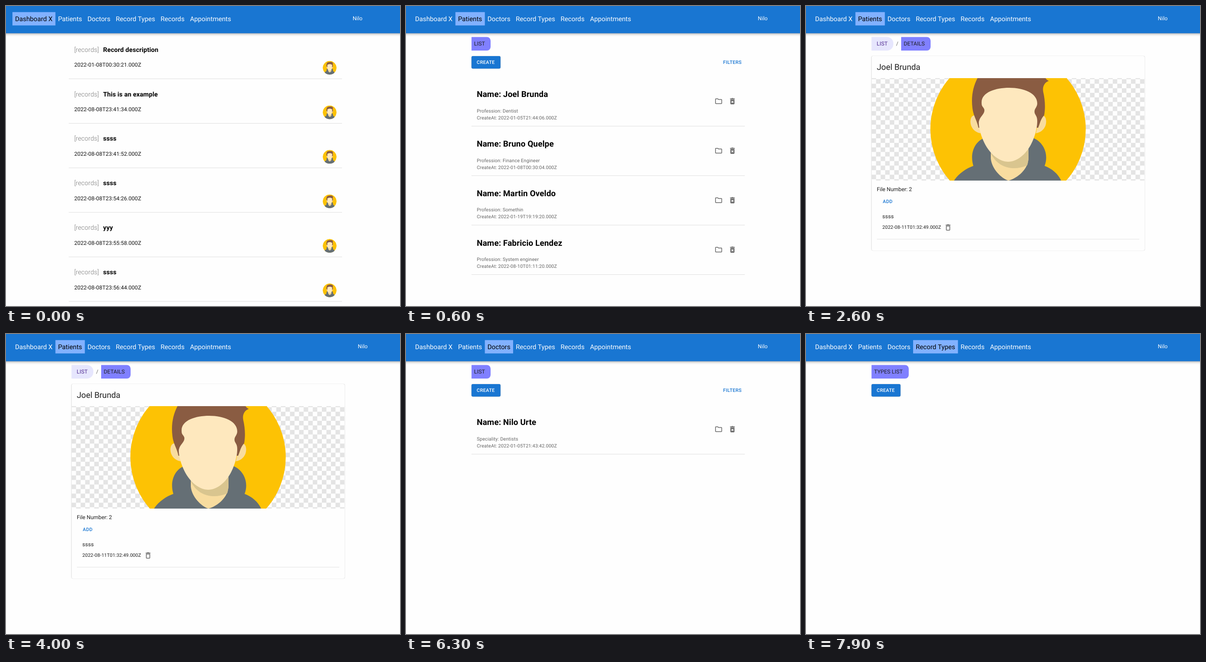
These frames come from a looping animation (857 px wide and 653 px high, 8 s). An HTML page:

```html
<!DOCTYPE html>
<html lang="en">
<head>
<meta charset="utf-8">
<title>Clinic dashboard</title>
<style>
  html, body { margin: 0; width: 100%; height: 100%; overflow: hidden; background: #fefefe; }
  svg { display: block; width: 100vw; height: 100vh; }
  text { font-family: Roboto, sans-serif; text-rendering: geometricPrecision; letter-spacing: .11px; white-space: pre; }
  .tight { letter-spacing: 0; }
  .btn { font-weight: 500; letter-spacing: .3px; }
  .bar { filter: drop-shadow(0 .8px 1.4px rgba(0,0,0,.22)) drop-shadow(0 3px 1.9px rgba(0,0,0,.14)) drop-shadow(0 .7px 3.7px rgba(0,0,0,.12)); }
  .raised { filter: drop-shadow(0 .7px .4px rgba(0,0,0,.2)) drop-shadow(0 .7px .4px rgba(0,0,0,.14)) drop-shadow(0 .7px 1.1px rgba(0,0,0,.12)); }
</style>
</head>
<body>
<svg id="stage" viewBox="0 0 857 653" preserveAspectRatio="none"></svg>
<script>
const BLUE = '#1976d2', INK = '#1f1f1f', GREY = '#666', VISITED = '#4f2a90', RULE = '#dedede';
const USER = 'Nilo';
const LOOP = 8000;

const text = (x, y, s, size = 11.89, fill = INK, weight = 400, cls = '') =>
  `<text x="${x}" y="${y}" font-size="${size}" fill="${fill}" font-weight="${weight}" class="${cls}">${s}</text>`;
const button = (x, y, s, fill = BLUE) => text(x, y, s, 10.4, fill, 500, 'btn');
const rect = (x, y, w, h, fill, extra = '') =>
  `<rect x="${x}" y="${y}" width="${w}" height="${h}" fill="${fill}" ${extra}/>`;
const path = (d, fill, extra = '') => `<path d="${d}" fill="${fill}" ${extra}/>`;
const line = (d, color, width) =>
  path(d, 'none', `stroke="${color}" stroke-width="${width}" stroke-linecap="round" stroke-linejoin="round"`);
const circle = (x, y, r, fill, extra = '') => `<circle cx="${x}" cy="${y}" r="${r}" fill="${fill}" ${extra}/>`;
const group = (body, attrs = '') => `<g ${attrs}>${body}</g>`;
const mirror = body => body + group(body, 'transform="matrix(-1 0 0 1 880 0)"');

const ICONS = {
  folder: 'M9.17 6l2 2H20v10H4V6h5.17M10 4H4c-1.1 0-2 .9-2 2v12c0 1.1.9 2 2 2h16c1.1 0 2-.9 2-2V8c0-1.1-.9-2-2-2h-8z',
  remove: 'M6 19c0 1.1.9 2 2 2h8c1.1 0 2-.9 2-2V7H6zm2.46-7.12 1.41-1.41L12 12.59l2.12-2.12 1.41 1.41L13.41 14l2.12 2.12-1.41 1.41L12 15.41l-2.12 2.12-1.41-1.41L10.59 14zM15.5 4l-1-1h-5l-1 1H5v2h14V4z',
  bin: 'M6 19c0 1.1.9 2 2 2h8c1.1 0 2-.9 2-2V7H6zM8 9h8v10H8zm7.5-5-1-1h-5l-1 1H5v2h14V4z'
};
const icon = (name, x, y) =>
  path(ICONS[name], '#666', `fill-rule="evenodd" transform="translate(${x} ${y}) scale(.743) translate(-12 -12)"`);

// Breadcrumb chip, rounded on the right only
const chip = (x, w, label, textX, fill = '#8080ff', r = 8, color = INK) =>
  path(`M${x} 67.5h${w - r}a${r} ${r} 0 0 1 ${r} ${r}v${29.5 - 2 * r}a${r} ${r} 0 0 1 ${-r} ${r}h${r - w}z`, fill) +
  text(textX, 86.3, label, 11.89, color, 400, 'tight');
const crumbs = () => chip(142.5, 47.5, 'LIST', 153.8, '#e6e6fd', 14, VISITED) +
  text(196, 86.3, '/', 11.89, GREY) + chip(207, 64, 'DETAILS', 212.5);
const create = () => rect(142.5, 109, 63, 27.3, BLUE, 'rx="3" class="raised"') + button(153.8, 126.4, 'CREATE', '#fff');
const card = h => rect(142.5, 109, 594.4, h, '#fefefe', 'rx="3" class="raised"');

// Navigation
const TABS = [['Dashboard X', 14, 93.5], ['Patients', 107.5, 64], ['Doctors', 171.5, 61.5],
  ['Record Types', 233, 97.5], ['Records', 330.5, 64], ['Appointments', 394.5, 101]];
const header = (active, userX) =>
  rect(-10, -10, 877, 69.3, BLUE, 'class="bar"') +
  TABS.map(([name, x, w], i) =>
    (i === active ? rect(x, 13.3, w, 29, '#82b1ff') : '') +
    text(x + 5.7, 32.7, name, 14.27, i === active ? '#000' : '#fff', 400, 'tight')).join('') +
  text(userX, 30.6, USER, 11.89, '#fff');

// Illustrations
const person = () =>
  circle(439.5, 268, 169, '#fdc204') +
  path('M280 440C292 410 310 394 322 380C332 364 350 353 364 348C356 322 366 297 386 288H496C516 297 529 322 519 348C535 354 548 365 555 380C570 396 588 410 600 440Z', '#656f75') +
  path('M402 312V332C404 355 425 375 440 380C460 375 484 355 484 330V308Z', '#f8dc9f') +
  path('M402 312V320C414 348 446 362 481 347C484 340 484 325 484 308Z', '#d9c58f') +
  path('M372 239C360 234 355 247 359 260C363 271 372 276 380 277Z', '#f8dc9f') +
  path('M508 239C520 234 525 247 521 260C517 271 508 276 500 277Z', '#f8dc9f') +
  path('M375 265C371 246 364 240 362 222C359 198 363 176 373 157C366 148 380 140 390 142C400 128 420 134 430 128C460 122 500 126 510 140C522 144 514 156 528 163C518 167 514 176 516 187C520 204 521 222 518 238C510 246 509 256 505 265Z', '#8a5c42') +
  path('M382 212C380 188 412 178 442 178C474 178 503 190 503 212C503 220 497 223 497 230C497 237 503 238 503 250C503 264 499 282 490 300C478 324 458 339 440 339C420 339 400 322 388 298C380 282 375 262 376 252C378 240 389 236 388 226C387 220 382 220 382 212Z', '#fee8be');

const avatar = y => group(person(), `clip-path="url(#round)" transform="translate(704 ${y}) scale(.0888) translate(-439.5 -268)"`);

const doctor = () =>
  rect(220, 180, 440, 240, '#3eae97') +
  path('M225 410L240 380C244 358 256 344 276 334C302 322 330 314 348 305L383 274H497L531 305C550 314 578 322 604 334C624 344 636 358 640 380L655 410Z', '#f5f5f3') +
  path('M384 268L412 408H468L497 268Z', '#8ec6e1') +
  mirror(path('M383 271L346 320L356 330L346 342L398 408H415Z', '#fff') +
    path('M367 184C359 192 364 228 382 230L388 184Z', '#f7bd98') +
    line('M369 196Q371 212 378 220', '#d99a75', 1.2)) +
  path('M386 240V276L440 318L495 276V240Z', '#fdcfb2') +
  path('M377 184C377 212 382 238 386 252C393 276 416 292 440 292C464 292 487 276 494 252C498 238 503 212 503 184Z', '#fdcfb2') +
  line('M386 252C393 276 416 292 440 292C464 292 487 276 494 252', '#dca578', 1.2) +
  mirror(
    path('M367 182H382C383 194 381 204 379 208C376 201 370 198 367 182Z', '#49302a') +
    path('M392 182H431V187Q412 183 394 188Z', '#3a2823') +
    path('M400 194Q412 186 426 195Q413 200 400 194Z', '#e9eff0') +
    circle(412.5, 193.3, 4.8, '#2382a6') + circle(412.5, 193.3, 2.4, '#142a35') +
    line('M399 193Q412 185 427 195', '#3a2823', 1.8) +
    line('M424 222Q423 231 432 228Q435 231 440 231', '#68443a', 1.2) +
    path('M386 280L400 346L440 318Z', '#8ec6e1') + line('M400 346L440 318', '#a9d5e9', 1)) +
  path('M414 250Q430 242 440 246Q450 242 466 250Q440 267 414 250Z', '#dfb0a4') +
  line('M414 250Q427 249 440 251Q453 249 466 250', '#a87970', 1) +
  line('M428 270Q440 265 452 270', '#f2c3a4', 1) +
  path('M440 318L418 330L434 358H446L462 330ZM434 358L422 408H457L446 358Z', '#0095a6') +
  line('M434 358H446', '#087784', 1) +
  line('M331 388L328 408M404 383L408 408', '#b5b5b5', 3) +
  line('M383 273C366 285 364 314 364 349M331 388C335 364 347 351 366 350C388 350 398 366 404 382M497 273C518 285 518 312 516 340C514 362 509 372 506 383', '#3d3a3a', 6.8) +
  circle(505, 396, 13.5, '#bcbcbc', 'stroke="#3d3a3a" stroke-width="2.5"') + circle(505, 396, 7.5, '#3d3a3a');

// Pages
const RECORDS = [['Record description', '01-08T00:30:21'], ['This is an example', '08-08T23:41:34'],
  ['ssss', '08-08T23:41:52'], ['ssss', '08-08T23:54:26'], ['yyy', '08-08T23:55:58'], ['ssss', '08-08T23:56:44']];
const PATIENTS = [['Joel Brunda', 'Dentist', '01-05T21:44:06'], ['Bruno Quelpe', 'Finance Engineer', '01-08T00:30:04'],
  ['Martin Oveldo', 'Somethin', '01-19T19:19:20'], ['Fabricio Lendez', 'System engineer', '08-10T01:11:20']];
const DOCTORS = [[USER + ' Urte', 'Dentists', '01-05T21:43:42']];
const stamp = s => `2022-${s}.000Z`;

const dashboard = () => RECORDS.map(([title, date], i) => {
  const y = i * 96.9;
  return text(148.4, 99.6 + y, '[records]', 13.91, '#777', 300) +
    text(211.3, 99.6 + y, title, 13.91, '#000', 700) +
    text(148.4, 132.3 + y, stamp(date), 11.89, '#111') +
    avatar(134.5 + y) + rect(136.5, 158 + y, 594.4, 1, RULE);
}).join('');

const list = (rows, job, hover) => chip(142.5, 41.5, 'LIST', 148) + create() + button(689.8, 126.4, 'FILTERS') +
  rows.map(([name, role, date], i) => {
    const y = i * 107.7;
    return text(154, 198.4 + y, 'Name: ' + name, 17.83, '#000', 700) +
      text(154, 232 + y, `${job}: ${role}`, 10.4, GREY) +
      text(154, 246.8 + y, 'CreateAt: ' + stamp(date), 10.4, GREY) +
      (hover && !i ? circle(680, 207.3, 14.9, '#f4f4f4') : '') +
      icon('folder', 680, 207.3 + y) + icon('remove', 710, 207.3 + y) +
      rect(142.5, 261 + y, 594.4, 1, RULE);
  }).join('');

const patientCard = () => crumbs() + card(423) + text(154, 139, PATIENTS[0][0], 17.83, INK, 400, 'tight') +
  group(rect(142.5, 157, 594.4, 222.9, 'url(#checker)') + person(), 'clip-path="url(#photo)"') +
  text(154, 402.6, 'File Number: 2', 11.89, INK, 400, 'tight') + button(167, 428.7, 'ADD') +
  text(166, 462.2, 'ssss') + text(166, 485.2, stamp('08-11T01:32:49'), 10.4) + icon('bin', 309, 482) +
  rect(154.4, 507, 570.6, 1, '#e2e2e2');

const pair = (y, label, value) =>
  text(154, y, `${label}: <tspan font-weight="400" fill="#777">${value}</tspan>`, 11.89, '#000', 700, 'tight');
const doctorCard = () => crumbs() + card(356) + text(154, 139, DOCTORS[0][0], 17.83, INK, 400, 'tight') +
  button(402.5, 173.7, 'EDIT', VISITED) + rect(402.5, 175, 23, 1, VISITED) + button(443.8, 173.7, 'DELETE') +
  group(group(doctor(), 'clip-path="url(#disc)"'), 'clip-path="url(#portrait)"') +
  pair(430.2, 'Speciality', DOCTORS[0][1]) + pair(444.3, 'CreatedAt', stamp(DOCTORS[0][2]));

const types = () => chip(142.5, 81, 'TYPES LIST', 148) + create();

// Start time, active tab, page
const SCENES = [
  [0, 0, dashboard()],
  [500, 1, list([], '')],
  [600, 1, list(PATIENTS, 'Profession')],
  [2500, 1, list(PATIENTS, 'Profession', true)],
  [2600, 1, patientCard()],
  [4800, 2, list([], '')],
  [4900, 2, list(DOCTORS, 'Speciality')],
  [6500, 2, doctorCard()],
  [7900, 3, types()]
];

const stage = document.getElementById('stage');
const clip = (id, shape) => `<clipPath id="${id}">${shape}</clipPath>`;
stage.innerHTML = '<defs>' +
  clip('round', circle(439.5, 268, 169, '#000')) +
  clip('disc', circle(439.5, 311, 209.5, '#000')) +
  clip('photo', rect(142.5, 157, 594.4, 222.9, '#000')) +
  clip('portrait', rect(142.5, 184, 594.4, 222.9, '#000')) +
  `<pattern id="checker" x="142.5" y="-28.8" width="19.8" height="19.8" patternUnits="userSpaceOnUse">
    ${rect(0, 0, 19.8, 19.8, '#fefefe')}${rect(0, 0, 9.9, 9.9, '#e4e4e4')}${rect(9.9, 9.9, 9.9, 9.9, '#e4e4e4')}
  </pattern></defs>` +
  SCENES.map(([, tab, page], i) => group(page + header(tab, i ? 765.3 : 754), 'class="scene" display="none"')).join('');

const scenes = stage.querySelectorAll('.scene');
let shown = -1;
function render(t) {
  const now = SCENES.filter(([start]) => start <= t).length - 1;
  if (now === shown) return;
  scenes.forEach((el, i) => el.setAttribute('display', i === now ? 'inline' : 'none'));
  shown = now;
}

const began = performance.now();
function tick() {
  render((performance.now() - began) % LOOP);
  requestAnimationFrame(tick);
}
tick();
</script>
</body>
</html>
```
